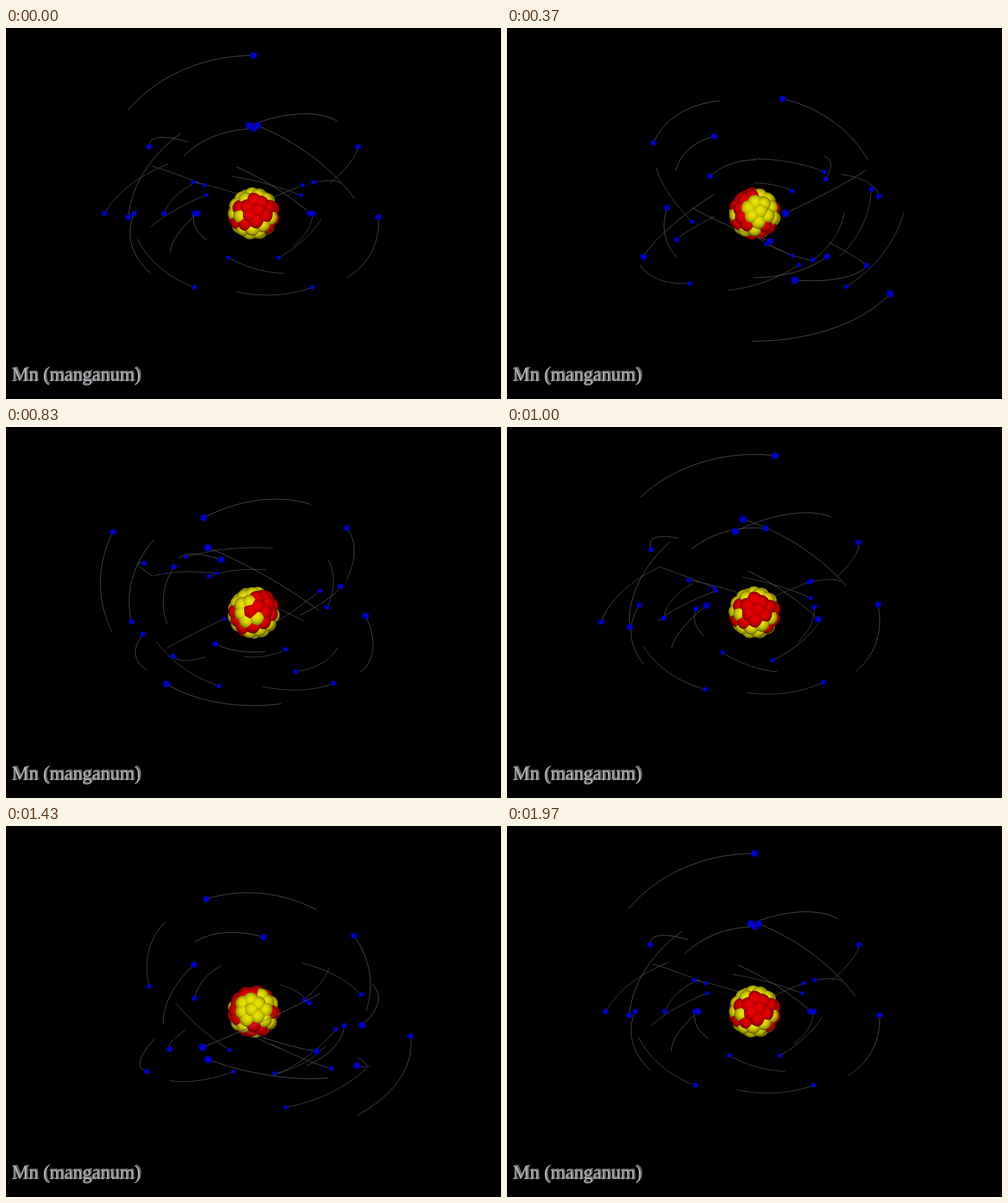
Recreate the animation shown at these times as an HTML page with a canvas. Size 800 by 600 pixels, loop 2 s.

```html
<!DOCTYPE html>
<html lang="en">
<head>
<meta charset="utf-8">
<title>Manganese atom</title>
<style>
  html, body { margin: 0; width: 100%; height: 100%; overflow: hidden; background: #000; }
  canvas { display: block; }
</style>
</head>
<body>
<canvas id="stage" width="800" height="600"></canvas>
<script>
const ctx = document.getElementById('stage').getContext('2d');
const { PI, sin, cos, sqrt, max, floor, ceil } = Math;
const CAMERA = 12.5, UNIT = 48.15, STEPS = 59, TURN = 4 * PI, TRAIL = PI / 4;

// The world (right, up, front) is tilted towards the camera
const TILT_COS = sqrt(2 / 3), TILT_SIN = sqrt(1 / 3);
const toView = ([a, b, c]) => [a, b * TILT_COS - c * TILT_SIN, b * TILT_SIN + c * TILT_COS];

// ---- Electrons ----
// Each shell fans its orbits evenly: every next one is tilted, swung and advanced a little more
const shells = [
  { radius: 2, count: 2, side: -1, advance: 1 },
  { radius: 3, count: 8, side: 1, advance: -6 },
  { radius: 4, count: 13, side: -1, advance: 4 },
  { radius: 5, count: 2, side: 1, advance: 2 }
];

const electrons = shells.flatMap(({ radius, count, side, advance }) =>
  Array.from({ length: count }, (_, i) => {
    const swing = i * PI / count, tilt = side * PI / 2 - swing;
    return {
      radius,
      phase: advance * swing - PI / 2,
      u: toView([-cos(tilt) * sin(swing), cos(tilt) * cos(swing), sin(tilt)]),
      v: toView([cos(swing), sin(swing), 0])
    };
  }));

function place({ radius, phase, u, v }, angle) {
  const c = radius * cos(phase + angle), d = radius * sin(phase + angle);
  const [x, y, z] = u.map((n, i) => n * c + v[i] * d);
  const s = CAMERA / (CAMERA - z);
  return { x: 400 + x * UNIT * s, y: 300 - y * UNIT * s, z, s };
}

function drawTrail(e, angle, near) {
  const parts = 24;
  ctx.beginPath();
  let a = place(e, angle - TRAIL);
  for (let i = 1; i <= parts; i++) {
    const b = place(e, angle - TRAIL * (1 - i / parts));
    if (b.z >= 0 === near) {
      ctx.moveTo(a.x, a.y);
      ctx.lineTo(b.x, b.y);
    }
    a = b;
  }
  ctx.strokeStyle = near ? '#5c5c5c' : '#505050';
  ctx.lineWidth = .9;
  ctx.stroke();
}

function drawBall({ x, y, s }) {
  const r = 4.5 * s;
  const fill = ctx.createRadialGradient(x, y, 0, x, y, r);
  fill.addColorStop(0, '#0000e0');
  fill.addColorStop(.6, '#0000cc');
  fill.addColorStop(1, '#000080');
  ctx.fillStyle = fill;
  ctx.beginPath();
  ctx.arc(x, y, r, 0, 7);
  ctx.fill();
}

function drawElectrons(angle, near) {
  electrons.forEach(e => drawTrail(e, angle, near));
  electrons.map(e => place(e, angle))
    .filter(q => q.z >= 0 === near)
    .sort((a, b) => a.z - b.z)
    .forEach(drawBall);
}

// ---- Nucleus: a spiral of balls, coloured in patches ----
const NUCLEONS = 55, PROTONS = 25;
const patch = ({ up, lon }) => cos(3 * lon) * sin(6 * up + .4) + 1.2 * up * cos(lon - .35);

const nucleons = Array.from({ length: NUCLEONS }, (_, i) => ({
  up: 1 - (2 * i + 1) / NUCLEONS,
  lon: i * PI * (3 - sqrt(5))
})).sort((a, b) => patch(b) - patch(a));

// Drawn at double size with a depth buffer, so that the balls cut into each other
const SIZE = 180, HALF = SIZE / 2, BALL = 26.5, ORBIT = 59;
const core = document.createElement('canvas');
core.width = core.height = SIZE;
const coreCtx = core.getContext('2d');

function drawNucleus(angle) {
  const image = coreCtx.createImageData(SIZE, SIZE);
  const depth = new Float32Array(SIZE * SIZE).fill(-SIZE);
  nucleons.forEach(({ up, lon }, n) => {
    const ring = sqrt(1 - up * up);
    const [x, y, z] = toView([ring * sin(lon - angle), up, ring * cos(lon - angle)]);
    const cx = HALF + x * ORBIT, cy = HALF - y * ORBIT;
    for (let j = ceil(cy - BALL); j < cy + BALL; j++) {
      for (let i = ceil(cx - BALL); i < cx + BALL; i++) {
        const dx = i - cx, dy = j - cy, h = BALL * BALL - dx * dx - dy * dy;
        const dz = sqrt(max(0, h)), k = j * SIZE + i;
        if (h <= 0 || z * ORBIT + dz <= depth[k]) continue;
        depth[k] = z * ORBIT + dz;
        const light = .3 + .7 * max(0, (dz * .99 - dy * .14) / BALL);
        image.data.set([232 * light, n < PROTONS ? 0 : 226 * light, 0, 255], 4 * k);
      }
    }
  });
  coreCtx.putImageData(image, 0, 0);
  ctx.drawImage(core, 400 - HALF / 2, 300 - HALF / 2, HALF, HALF);
}

// ---- Caption with a short extrusion ----
function drawCaption() {
  ctx.font = '30.9px "Liberation Serif", "Times New Roman", serif';
  for (let d = 2.4; d > -.1; d -= .4) {
    ctx.fillStyle = d > .3 ? '#66666a' : '#b0b0b4';
    ctx.fillText('Mn (manganum)', 9 + d, 570.5 - d * .6);
  }
}

function draw(time) {
  // The last step repeats the first pose
  const step = Math.min(STEPS, floor(time % 2000 * .03 + .15));
  const angle = TURN * step / STEPS;
  ctx.fillStyle = '#000';
  ctx.fillRect(0, 0, 800, 600);
  drawElectrons(angle, false);
  drawNucleus(angle);
  drawElectrons(angle, true);
  drawCaption();
}

let begin;
function tick(now) {
  begin ??= now;
  draw(now - begin);
  requestAnimationFrame(tick);
}
requestAnimationFrame(tick);
</script>
</body>
</html>
```
